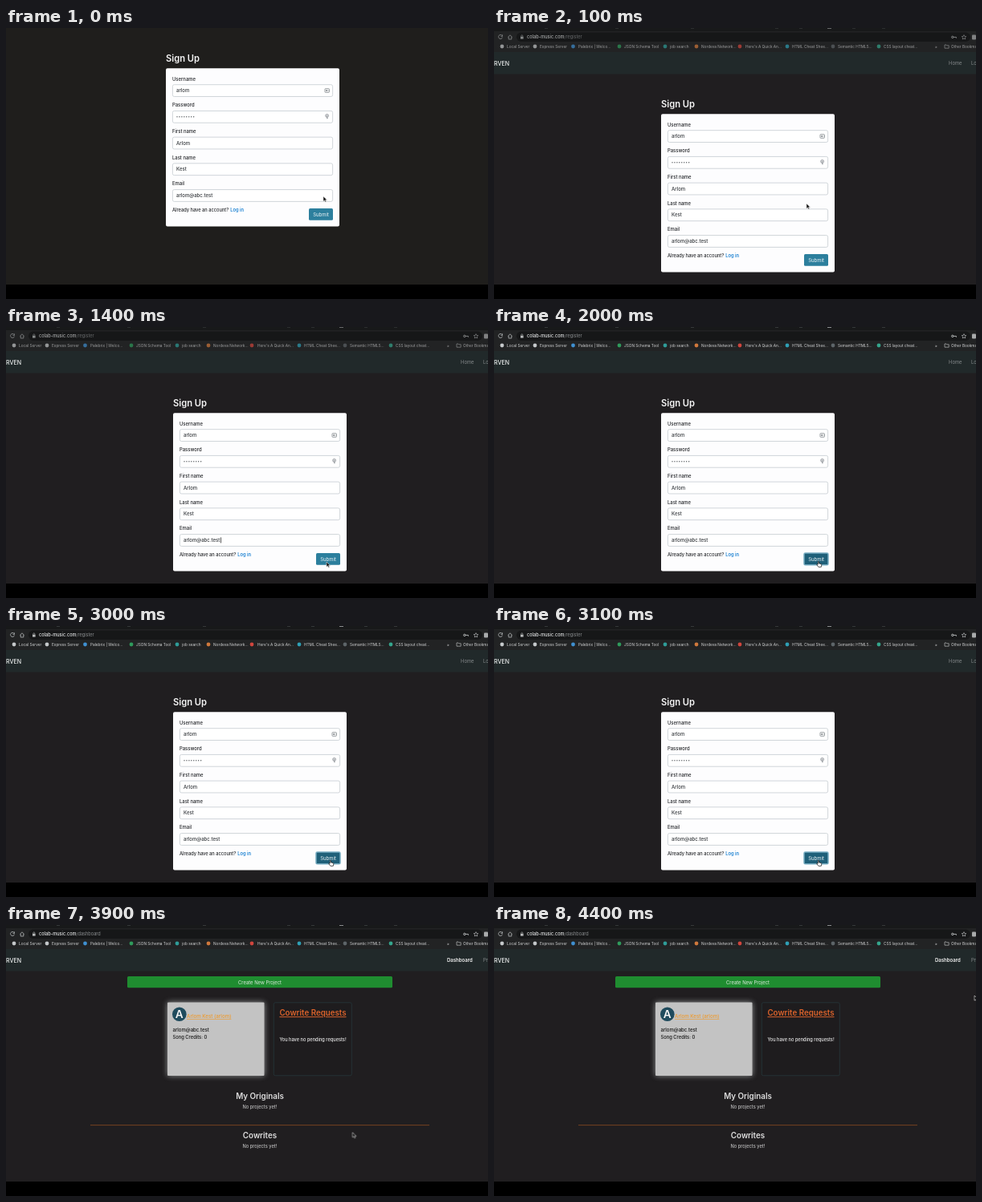
Animation, 600 px wide and 338 px high, one loop 4.5 s. Source, as an HTML page:

```html
<!DOCTYPE html>
<html lang="en">
<head>
<meta charset="utf-8">
<title>Sign up and dashboard</title>
<style>
  html, body { margin: 0; width: 100%; height: 100%; overflow: hidden; background: #000; }
  svg { display: block; width: 100%; height: 100%; font: 6px Inter, "Open Sans", sans-serif; }
  .soft { filter: blur(.3px); }
  .mid { text-anchor: middle; }
  .med { font-weight: 500; }
  .bold { font-weight: 600; }
  .line { text-decoration: underline; }
  .mark { font-size: 4.75px; fill: #d4d5d6; }
  .url { font-size: 5.6px; }

  .intro, .browser, .toolbar, .shift, .form, .dash, .caret, .pressed, .arrow {
    animation: 4500ms step-end infinite;
  }
  .intro { animation-name: intro; }
  .browser { animation-name: browser; }
  .toolbar { animation-name: toolbar; }
  .shift { animation-name: shift; }
  .form { animation-name: form; }
  .dash { animation-name: dash; }
  .caret { animation-name: caret; }
  .pressed { animation-name: pressed; }
  .arrow { animation-name: arrow; }
  .pointer { animation: move 4500ms linear infinite; }

  @keyframes intro { 0% { visibility: visible } 2.222%, 100% { visibility: hidden } }
  @keyframes browser { 0% { visibility: hidden } 2.222%, 100% { visibility: visible } }
  @keyframes shift { 0% { transform: translate(-9px, -57px) } 2.222%, 100% { transform: none } }
  /* the page changes at 3200 ms */
  @keyframes form { 0% { opacity: 1 } 71.111%, 100% { opacity: 0 } }
  @keyframes dash { 0% { opacity: 0 } 71.111%, 100% { opacity: 1 } }
  /* the button is pressed at 1600 ms */
  @keyframes toolbar { 0% { opacity: .7 } 35.556%, 100% { opacity: 1 } }
  @keyframes pressed { 0% { opacity: 0 } 35.556% { opacity: 1 } 71.111%, 100% { opacity: 0 } }
  @keyframes arrow { 0% { opacity: 1 } 35.556% { opacity: 0 } 71.111%, 100% { opacity: 1 } }
  @keyframes caret {
    0% { opacity: 0 } 8.889% { opacity: 1 } 20% { opacity: 0 }
    31.111% { opacity: 1 } 35.556%, 100% { opacity: 0 }
  }
  /* ten pointer positions per second */
  @keyframes move {
    0% { transform: translate(395px, 210px); animation-timing-function: step-end }
    2.222% { transform: translate(389px, 219px); animation-timing-function: steps(5) }
    13.333% { transform: translate(392px, 242px); animation-timing-function: steps(6) }
    26.667% { transform: translate(399px, 292px); animation-timing-function: step-end }
    31.111% { transform: translate(399px, 293px); animation-timing-function: steps(2) }
    35.556%, 80% { transform: translate(403px, 292px); animation-timing-function: steps(2) }
    84.444% { transform: translate(411px, 282px); animation-timing-function: steps(3) }
    91.111% { transform: translate(472px, 212px); animation-timing-function: step-end }
    93.333% { transform: translate(520px, 161px); animation-timing-function: step-end }
    95.556% { transform: translate(566px, 116px); animation-timing-function: step-end }
    97.778%, 100% { transform: translate(598px, 88px) }
  }
</style>
</head>
<body>
<svg id="stage" viewBox="0 0 600 338"></svg>
<script>
const text = (x, y, s, fill, cls = '', size = 6) =>
  `<text x="${x}" y="${y}" fill="${fill}" class="${cls}" style="font-size:${size}px">${s}</text>`;
const rect = (x, y, w, h, fill, more = '') =>
  `<rect x="${x}" y="${y}" width="${w}" height="${h}" fill="${fill}" ${more}/>`;
const dot = (x, y, r, fill, more = '') =>
  `<circle cx="${x}" cy="${y}" r="${r}" fill="${fill}" ${more}/>`;
const path = (d, stroke, w = 0.8, fill = 'none') =>
  `<path d="${d}" stroke="${stroke}" stroke-width="${w}" fill="${fill}"/>`;
// The whole address, so that the route follows the host at its natural width.
const address = route => `<text x="41" y="13.4" class="url" fill="#e8eaeb">`
  + `<tspan class="med">colab-music.com</tspan><tspan fill="#8c8f91">${route}</tspan></text>`;

const bookmarks = [
  [10, 16, '#c4c7c9', 'Local Server'],
  [51, 57, '#c4c7c9', 'Express Server'],
  [98.5, 105, '#3f8fd0', 'Palebrix | Welco...'],
  [156, 162, '#2f9a5b', 'JSON Schema Tool'],
  [213, 219, '#2f9c98', 'job search'],
  [252, 258, '#d0783c', 'Nordeva Network...'],
  [306, 313, '#d0453d', 'Here\'s A Quick An...'],
  [365, 371, '#2f9fb5', 'HTML Cheat Shee...'],
  [422, 428, '#5d6468', 'Semantic HTML5...'],
  [479, 485, '#35a58c', 'CSS layout cheat...']
];

function browserBar() {
  const tabs = [63, 151, 245, 350, 380, 446, 483];
  return rect(0, 0, 600, 30, '#222324')
    + rect(0, 0, 600, 4, '#18191a')
    + rect(28, 5.5, 565, 11.5, '#161718', 'rx="5.7"')
    + `<g class="toolbar">`
    + tabs.map(x => rect(x, 0, 4, 0.8, '#3e4042')).join('')
    + rect(415, 0, 5, 1, '#8a8c8e')
    + path('M10 9.4a2.5 2.5 0 1 0 .5 2.2M10.5 8.4v2h-2', '#b8babb')
    + path('M17.3 11.4l2.7-2.6 2.7 2.6M18.2 11v3h3.6v-3', '#b8babb')
    + rect(33, 10.8, 3.6, 2.8, '#b8babb') + path('M33.8 11v-1.2a1 1 0 0 1 2 0V11', '#b8babb', 0.6)
    + `<g class="form">${address('/register')}</g><g class="dash">${address('/dashboard')}</g>`
    + dot(570.8, 11.4, 1.2, 'none', 'stroke="#cfd1d2" stroke-width=".9"')
    + path('M572 11.4h3.4v1.4', '#cfd1d2')
    + path('M585 8.6l.8 1.8 2 .2-1.5 1.4.4 2-1.7-1-1.7 1 .4-2-1.5-1.4 2-.2z', '#cfd1d2', 0.6)
    + rect(595, 8.5, 5, 6, '#a9abac', 'rx="1"')
    + bookmarks.map(([ix, x, color, label]) =>
        dot(ix, 23, 2.4, color) + `<text x="${x}" y="24.6" class="mark">${label}</text>`).join('')
    + '<text x="549" y="24.6" class="mark">»</text>'
    + path('M561 21h2l.6.8h2.6v3.4H561z', '#b8babb', 0.7)
    + '<text x="569" y="24.6" class="mark">Other Bookmarks</text></g>';
}

function field(label, value, i) {
  const y = 135 + i * 32.72;
  return text(216, y - 12.5, label, '#222427', 'med', 5.9)
    + rect(216.4, y - 7.3, 199.2, 14.8, '#fff', 'rx="2" stroke="#c6ccd1" stroke-width=".8"')
    + text(221, y + 2.2, value, '#34383c', 'med');
}

function signUp() {
  const fields = [
    ['Username', 'arlom'], ['Password', ''], ['First name', 'Arlom'],
    ['Last name', 'Kest'], ['Email', 'arlom@abc.test']
  ];
  const secret = Array.from({ length: 8 }, (_, i) => dot(222 + i * 2.95, 167.8, 0.7, '#54585c'));
  return text(208, 98.6, 'Sign Up', '#f4f4f4', 'bold', 11.2)
    + rect(208, 107.3, 216, 197.2, '#fdfdfe', 'rx="2"')
    + fields.map(([label, value], i) => field(label, value, i)).join('')
    + secret.join('')
    + rect(406, 132.7, 5.4, 4.6, 'none', 'rx=".6" stroke="#8d9296" stroke-width=".9"')
    + rect(407.3, 134, 1.7, 2, '#8d9296') + path('M409.6 134.5h1.2M409.6 135.8h1.2', '#8d9296', 0.5)
    + dot(408.6, 166.4, 2, '#d4d6d8', 'stroke="#9a9ea2" stroke-width=".8"')
    + path('M408.6 166v4.3M408.6 169.4h1.4', '#9a9ea2')
    + rect(267, 262.4, 0.7, 7, '#111', 'class="caret"')
    + text(216, 286.1, 'Already have an account?', '#222427', 'med', 5.7)
    + text(288.3, 286.1, 'Log in', '#1c82d2', 'bold', 5.75)
    + rect(386, 282, 30, 14.8, '#2c7f9d', 'rx="1.6"')
    + `<g class="pressed">${rect(386, 282, 30, 14.8, '#1f6079', 'rx="1.6" stroke="#75abc0" stroke-width="1.5"')}</g>`
    + text(401, 291.6, 'Submit', '#eef5f7', 'mid');
}

function dashboard() {
  return text(549, 46.3, 'Dashboard', '#f5f5f5', 'bold')
    + text(594, 46.3, 'Profile', '#85898b')
    + rect(151, 64, 330, 14.2, '#1f8d30', 'rx="1.5"')
    + text(316, 73.5, 'Create New Project', '#dceade', 'mid', 5.9)
    + rect(201, 96.5, 120.5, 91.5, '#b4b8b8', 'rx="1" opacity=".8" filter="url(#glow)"')
    + rect(201, 96.5, 120.5, 91.5, '#c3c3c3', 'rx="1"')
    + dot(215.8, 111.2, 8.8, '#1f4b5d')
    + text(215.8, 116.2, 'A', '#f6f6f6', 'mid bold', 13.6)
    + text(225, 116, 'Arlom Kest (arlom)', '#ee9a2d', 'med line', 6.2)
    + text(207.5, 133.2, 'arlom@abc.test', '#161616', 'med')
    + text(207.5, 142.3, 'Song Credits: 0', '#161616', 'med', 5.8)
    + rect(333.3, 96.8, 97, 91, '#1e1c1e', 'rx="2" stroke="#26393d" stroke-width=".8"')
    + text(382, 113.2, 'Cowrite Requests', '#dc632b', 'mid bold line', 9.75)
    + text(382, 145.3, 'You have no pending requests!', '#ededed', 'mid med', 5.65)
    + text(316, 216.5, 'My Originals', '#dedede', 'mid bold', 9.8)
    + text(316, 229, 'No projects yet!', '#bdbdbd', 'mid med', 5.7)
    + rect(105, 249.3, 422, 0.8, '#8a4a22')
    + text(316, 266, 'Cowrites', '#dedede', 'mid bold', 9.8)
    + text(316, 278.4, 'No projects yet!', '#bdbdbd', 'mid med', 5.7);
}

const arrow = '<path d="M0 0v6.2l1.5-1.3 1 2.2 1.1-.5-1-2.1h2z" fill="#111" stroke="#ddd" stroke-width=".6"/>';
const hand = '<path d="M.2.7q.7-1 1.3 0v2.2l2.6.6q.8.3.7 1.2l-.5 2.6H.9L-1.3 4.5q0-1 1.5-.2z" fill="#fff" stroke="#111" stroke-width=".7"/>';

document.getElementById('stage').innerHTML = `
  <defs><filter id="glow" x="-20%" y="-20%" width="140%" height="140%">
    <feGaussianBlur stdDeviation="3.6"/></filter></defs>
  ${rect(0, 0, 600, 320, '#201e20')}
  <g class="intro">${rect(0, 0, 600, 320, '#1f1e1c')}</g>
  <g class="soft">
    <g class="browser">
      ${browserBar()}
      ${rect(0, 30, 600, 27.5, '#21292a')}
      ${text(0, 46.8, 'RVEN', '#eceeee', 'med', 7.1)}
    </g>
    <g class="form">
      <g class="browser">
        ${text(566, 46.3, 'Home', '#85898b', '', 5.9)}
        ${text(594, 46.3, 'Log in', '#85898b', '', 5.9)}
      </g>
      <g class="shift">${signUp()}</g>
    </g>
    <g class="dash">${dashboard()}</g>
    <g class="pointer"><g class="arrow">${arrow}</g><g class="pressed">${hand}</g></g>
  </g>
  ${rect(0, 320, 600, 18, '#000')}`;
</script>
</body>
</html>
```
